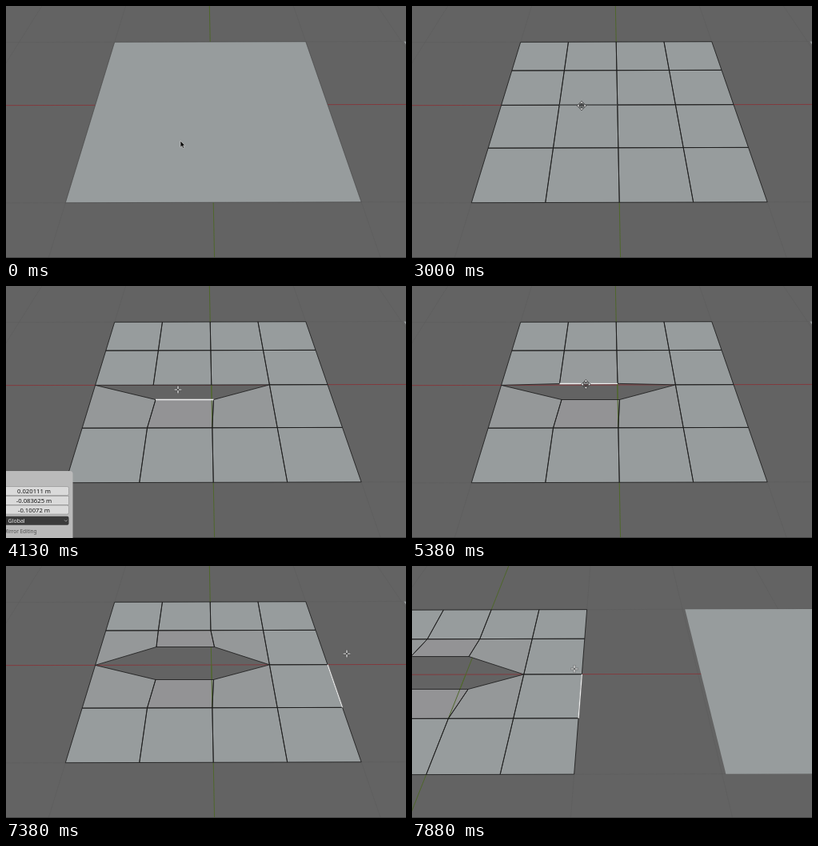
An HTML page for the animation above (8000 ms loop, 500 px wide and 316 px high).

```html
<!DOCTYPE html>
<html lang="en">
<head>
<meta charset="utf-8">
<title>Ripping a mesh edge</title>
<style>
  html, body { margin: 0; width: 100%; height: 100%; overflow: hidden; background: #636363; }
  svg { display: block; width: 500px; height: 316px; }
  path { fill: none; }
  #grid { stroke: #585858; stroke-width: .6; opacity: .6; }
  #red { stroke: #823a3e; }
  .green { stroke: #50682c; }
  .plane { fill: #979c9d; }
  #whole { stroke: #4a4a4a; stroke-width: .7; }
  #wires { stroke: #1c1c1c; stroke-width: .85; stroke-linejoin: round; }
  #dots { stroke: #111; stroke-width: 2.4; stroke-linecap: round; }
  #picked { stroke: #eee; stroke-width: 1.3; }
  #picked.seam { stroke: #6f7374; stroke-width: .9; }
  #panel { font: 7.7px "Noto Sans", "Open Sans", sans-serif; fill: #151515; }
  #fields rect { fill: #dadada; stroke: #808080; stroke-width: .5; }
  .shade { stroke: #2d2d2d; stroke-width: 2.6; opacity: .5; }
  .light { stroke: #f0f0f0; stroke-width: 1.2; }
</style>
</head>
<body>
<svg viewBox="0 0 500 316">
  <rect width="500" height="316" fill="#636363"/>
  <path id="grid"/>
  <path id="red"/>
  <path id="axis" class="green"/>
  <path id="neighbour" class="plane"/>
  <path id="whole" class="plane"/>
  <g id="mesh">
    <g id="faces"></g>
    <path id="nearAxis" class="green"/>
    <path id="wires"/>
    <path id="dots"/>
    <path id="picked"/>
  </g>
  <rect y="315" width="500" height="1" fill="#444"/>

  <g id="panel">
    <path d="M0 232H80Q83.500 232 83.500 235.500V316H0Z" style="fill:#bababa"/>
    <g id="fields">
      <rect x="-5" y="251.500" width="83.500" height="11" rx="2"/>
      <rect x="-5" y="263.300" width="83.500" height="11"/>
      <rect x="-5" y="275.100" width="83.500" height="11" rx="2"/>
    </g>
    <g id="values" text-anchor="middle">
      <text x="35" y="259.900"></text>
      <text x="35" y="271.700"></text>
      <text x="35" y="283.500"></text>
    </g>
    <rect x="-5" y="288.800" width="83.500" height="11" rx="2" fill="#3b3b3b"/>
    <text x="2.500" y="297" style="font-size:7px;fill:#eee">Global</text>
    <path d="M73 293.400l1.800 1.800l1.800-1.800" stroke="#aaa" stroke-width=".8"/>
    <text id="mirror" x="38.500" y="309.700" text-anchor="end" style="font-size:6.400px">Mirror Editing</text>
  </g>

  <g id="cursor">
    <path id="arrow" d="M0 0V8.300L1.900 6.600L3.200 9.300L4.700 8.600L3.400 6H5.800Z" style="fill:#0c0c0c" stroke="#ddd" stroke-width=".6"/>
    <g id="cross">
      <path class="shade" d="M-5 0H5M0-5V5"/>
      <path class="light" d="M-4.500 0H-1M1 0H4.500M0-4.500V-1M0 1V4.500"/>
    </g>
    <g id="move">
      <path class="shade" d="M-4 0H4M0-4V4"/>
      <path d="M0-6L2.500-3H-2.500ZM0 6L2.500 3H-2.500ZM-6 0L-3-2.500V2.500ZM6 0L3-2.500V2.500Z" style="fill:#f0f0f0" stroke="#333" stroke-width=".8"/>
    </g>
  </g>
</svg>

<script>
const $ = id => document.getElementById(id);
const LOOP = 8000, STEP = 125;
const FLAT = [151, 156, 157], BENT = [147, 147, 149];

const mix = (a, b, k) => a.map((v, i) => v + (b[i] - v) * k);
const within = (t, a, b) => t >= a && t < b;
const show = (id, on) => $(id).style.display = on ? "" : "none";
const draw = (id, d) => $(id).setAttribute("d", d);

// Smooth 0..1 between two times
function ease(t, from, to) {
  const k = Math.min(1, Math.max(0, (t - from) / (to - from)));
  return k * k * (3 - 2 * k);
}

// Each glide starts where the one before it ended
const GLIDES = [
  { from: 1000, to: 1125, pos: [204, 151] },
  { from: 1125, to: 1750, pos: [212, 125] },
  { from: 3000, to: 3750, pos: [215, 144] },
  { from: 3875, to: 4125, pos: [215, 130] },
  { from: 4125, to: 4625, pos: [217, 125] },
  { from: 5250, to: 6000, pos: [222, 102] },
  { from: 6125, to: 6875, pos: [411, 149] },
  { from: 6875, to: 7375, pos: [426, 110] },
  { from: 7375, to: 7875, pos: [203, 129] }
];
const cursorAt = t =>
  GLIDES.reduce((p, g) => mix(p, g.pos, ease(t, g.from, g.to)), [218, 169]);

// Ground point as [x, y, scale]; panning moves it in proportion to scale
function ground(u, v) {
  const w = 1000 / (4.184 - .37 * v);
  const x = 247.9 + w * (u + .0306);
  return [x, -322.7 + w * 1.5385 - (x - 257) * .0025, w];
}

let pan = 0;
const at = ([x, y, w]) =>
  (x - .653 * pan * w).toFixed(2) + " " + (y + .0415 * pan * w).toFixed(2);
const poly = pts => "M" + pts.map(at).join("L");
const square = u =>
  poly([ground(u, 0), ground(u + 1, 0), ground(u + 1, 4), ground(u, 4)]) + "Z";

for (let n = 0; n < 16; n++)
  $("faces").append(document.createElementNS("http://www.w3.org/2000/svg", "path"));

function drawGround() {
  let grid = "";
  for (let u = -2; u <= 3; u += .5) grid += poly([ground(u, -5), ground(u, 7)]);
  for (const v of [0, 4]) grid += poly([ground(-2, v), ground(3, v)]);
  draw("grid", grid);
  draw("red", poly([ground(-2, 2), ground(3, 2)]));
  draw("axis", poly([ground(0, -5), ground(0, 7)]));
  draw("nearAxis", poly([ground(0, 2), ground(0, 3)]));
  draw("neighbour", square(1.013));
  draw("whole", square(-.5));
}

function drawMesh(t) {
  const low = ease(t, 3000, 3750), high = ease(t, 5250, 6000);

  // The two middle seam vertices split: row 2 owns the lower copy
  const vertex = (i, j, row) => {
    const p = ground(i / 4 - .5, j);
    if (j !== 2 || (i !== 1 && i !== 2)) return p;
    const x = 114.5 + 72.5 * i;
    return row === 2 ? mix(p, [x, 142.5, 290], low) : mix(p, [x + 1, 101.5, 290], high);
  };

  let wires = "", dots = "";
  [...$("faces").children].forEach((face, n) => {
    const i = n % 4, j = n >> 2;
    const d = poly([
      vertex(i, j, j), vertex(i + 1, j, j), vertex(i + 1, j + 1, j), vertex(i, j + 1, j)
    ]) + "Z";
    const bend = [0, high, low, 0][j] * (1 - Math.abs(i - 1) / 2);
    face.setAttribute("d", d);
    face.style.fill = `rgb(${mix(FLAT, BENT, bend).map(Math.round)})`;
    wires += d;
  });
  for (let n = 0; n < 25; n++) dots += "M" + at(vertex(n % 5, n / 5 | 0, 1)) + "h.01";
  draw("wires", wires);
  draw("dots", dots);
  show("dots", t < 625);
  show("nearAxis", low > 0);

  let edge;
  if (t < 1500) edge = [vertex(0, 3), vertex(0, 4)];
  else if (t < 4750) edge = [vertex(1, 2, 2), vertex(2, 2, 2)];
  else if (t < 6875) edge = [vertex(1, 2, 1), vertex(2, 2, 1)];
  else edge = [vertex(4, 2), vertex(4, 3)];
  draw("picked", poly(edge));
  // Overlapping seams look grey until they part
  $("picked").setAttribute("class", t >= 1500 && low === 0 ? "seam" : "");
}

function drawPanel(t) {
  const first = within(t, 3875, 4750);
  const values = first ? ["0.020111 m", "-0.083625 m", "-0.10072 m"]
                       : ["0.024924 m", "0.096498 m", "0.11646 m"];
  [...$("values").children].forEach((text, i) => text.textContent = values[i]);
  $("mirror").style.fill = first ? "#505050" : "#151515";
  show("panel", first || within(t, 6000, 6875));
}

function drawCursor(t, edit) {
  const moving = within(t, 2000, 3875) || within(t, 4875, 6000);
  show("arrow", !edit);
  show("cross", edit && !moving);
  show("move", moving);
  $("cursor").setAttribute("transform", `translate(${cursorAt(t)})`);
}

function render(t) {
  const edit = t >= STEP;
  pan = ease(t, 7375, 7875);
  drawGround();
  drawMesh(t);
  show("whole", !edit);
  show("mesh", edit);
  drawPanel(t);
  drawCursor(t, edit);
}

const start = performance.now();
let last = -1;
function tick() {
  const t = Math.floor((performance.now() - start) % LOOP / STEP) * STEP;
  if (t !== last) render(last = t);
  requestAnimationFrame(tick);
}
tick();
</script>
</body>
</html>
```
